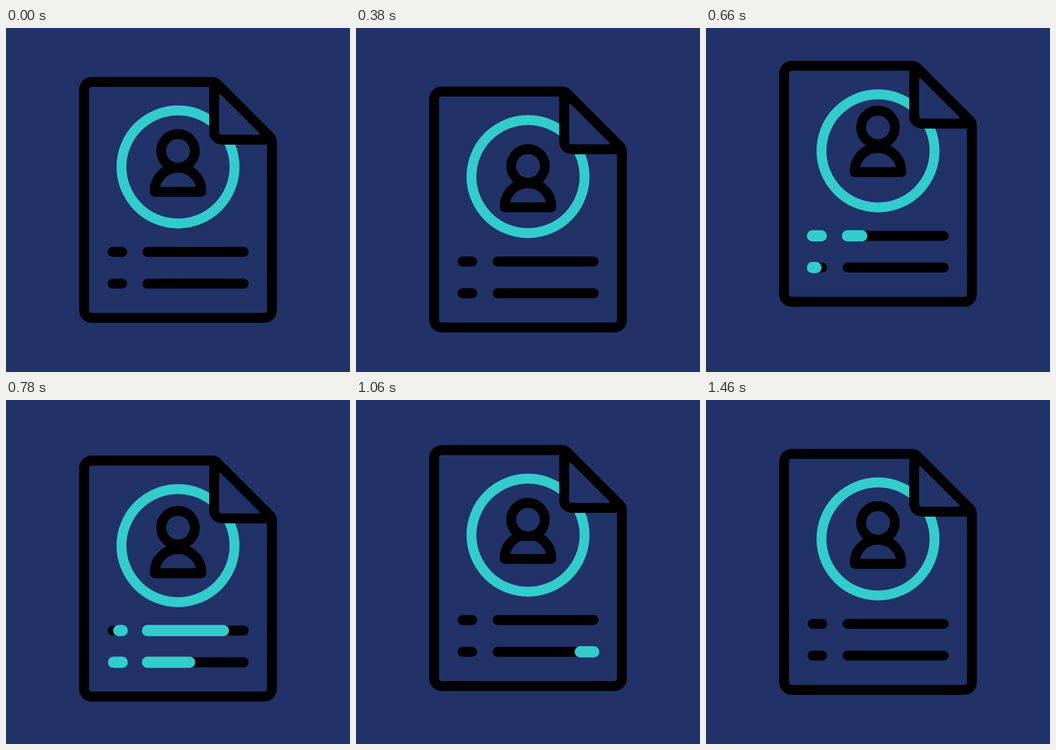
These frames come from a looping animation (640 px wide and 640 px high, 1.56 s). An HTML page without scripts:

```html
<!DOCTYPE html>
<html lang="en">
<head>
<meta charset="utf-8">
<title>Profile document</title>
<style>
  @property --head { syntax: "<number>"; inherits: false; initial-value: 0; }
  @property --tail { syntax: "<number>"; inherits: false; initial-value: 0; }

  :root { --navy: #213268; --teal: #33cccc; --ease: cubic-bezier(.333, 0, .667, 1); }
  html, body { margin: 0; height: 100%; overflow: hidden; background: var(--navy); }
  svg { display: block; width: 100vw; height: 100vh; }

  .ink { fill: none; stroke: #000; stroke-width: 18.4; stroke-linejoin: round; }
  .round { stroke-linecap: round; }
  .ring { stroke: var(--teal); }
  .solid { fill: var(--navy); }

  .sheet, .shoulders, .face { animation: 1560ms var(--ease) infinite; }
  .sheet { animation-name: sheet; }
  .shoulders { animation-name: shoulders; }
  .face { animation-name: face; }

  @keyframes sheet {
    0%, 12.82% { transform: translateY(0); }
    22.88% { transform: translateY(19.5px); }
    38.65% { transform: translateY(-39.5px); }
    53.21% { transform: translateY(19.5px); }
    71.92% { transform: translateY(-10.5px); }
    90.45%, 100% { transform: translateY(0); }
  }
  @keyframes shoulders {
    0%, 13.53% { transform: translateY(0); }
    23.59% { transform: translateY(29.5px); }
    39.1% { transform: translateY(-46px); }
    54.23% { transform: translateY(32px); }
    72.95% { transform: translateY(-17.7px); }
    92.31%, 100% { transform: translateY(0); }
  }
  @keyframes face {
    0%, 14.42% { transform: translateY(0); }
    24.49% { transform: translateY(28px); }
    40.26% { transform: translateY(-48px); }
    54.81% { transform: translateY(28px); }
    73.53% { transform: translateY(-15px); }
    92.63%, 100% { transform: translateY(0); }
  }

  /* A teal stroke grows from the left, then its left end catches up. */
  .sweep {
    fill: none; stroke: var(--teal); stroke-width: 21; stroke-linecap: round;
    stroke-dasharray: calc((var(--head) - var(--tail)) * 1px) 3px;
    stroke-dashoffset: calc(var(--tail) * -1px);
    visibility: hidden;
    animation-duration: 1560ms;
    animation-delay: var(--delay);
    animation-iteration-count: infinite;
    animation-timing-function: var(--ease), var(--ease), step-end;
  }
  .short { animation-name: short-head, short-tail, short-show; }
  .long { animation-name: long-head, long-tail, long-show; }

  @keyframes short-head { 0% { --head: 0; } 9.74%, 100% { --head: 1; } }
  @keyframes short-tail { 0%, 9.74% { --tail: 0; } 19.49%, 100% { --tail: 1; } }
  @keyframes short-show { 0% { visibility: visible; } 19.49%, 100% { visibility: hidden; } }

  @keyframes long-head { 0% { --head: 0; } 16.67%, 100% { --head: 1; } }
  @keyframes long-tail { 0%, 12.82% { --tail: 0; } 29.49%, 100% { --tail: 1; } }
  @keyframes long-show { 0% { visibility: visible; } 29.49%, 100% { visibility: hidden; } }
</style>
</head>
<body>
<svg viewBox="0 0 640 640">
  <defs>
    <path id="dash" d="M198.2 0H216.2" pathLength="1"/>
    <path id="bar" d="M263.3 0H442.3" pathLength="1"/>
  </defs>

  <g class="sheet">
    <circle class="ink ring" cx="320" cy="258.5" r="105.2"/>
    <path class="ink solid" d="M387.3 100.3V193.7a14 14 0 0 0 14 14H494.7
      M387.3 125a11 11 0 0 1 18.8-7.8M470 207.7a11 11 0 0 0 7.8-18.8"/>
    <path class="ink" d="M159.3 100.3H383.4a14 14 0 0 1 9.9 4.1L490.6 201.7a14 14 0 0 1 4.1 9.9
      V525.3a14 14 0 0 1-14 14H159.3a14 14 0 0 1-14-14V114.3a14 14 0 0 1 14-14Z"/>

    <g class="ink round">
      <path d="M198.2 416.5H216.2M263.3 416.5H442.3M198.2 475.5H216.2M263.3 475.5H442.3"/>
    </g>
    <g transform="translate(0 416.5)">
      <path class="sweep short" style="--delay: 538ms" d="M198.2 0H216.2" pathLength="1"/>
      <path class="sweep long" style="--delay: 598ms" d="M263.3 0H442.3" pathLength="1"/>
    </g>
    <g transform="translate(0 475.5)">
      <path class="sweep short" style="--delay: 600ms" d="M198.2 0H216.2" pathLength="1"/>
      <path class="sweep long" style="--delay: 662ms" d="M263.3 0H442.3" pathLength="1"/>
    </g>
  </g>

  <path class="ink shoulders" d="M276.7 304.7V303a43.3 43.3 0 0 1 86.6 0V304.7Z"/>
  <circle class="ink solid face" cx="320" cy="228.6" r="31.3"/>
</svg>
</body>
</html>
```
